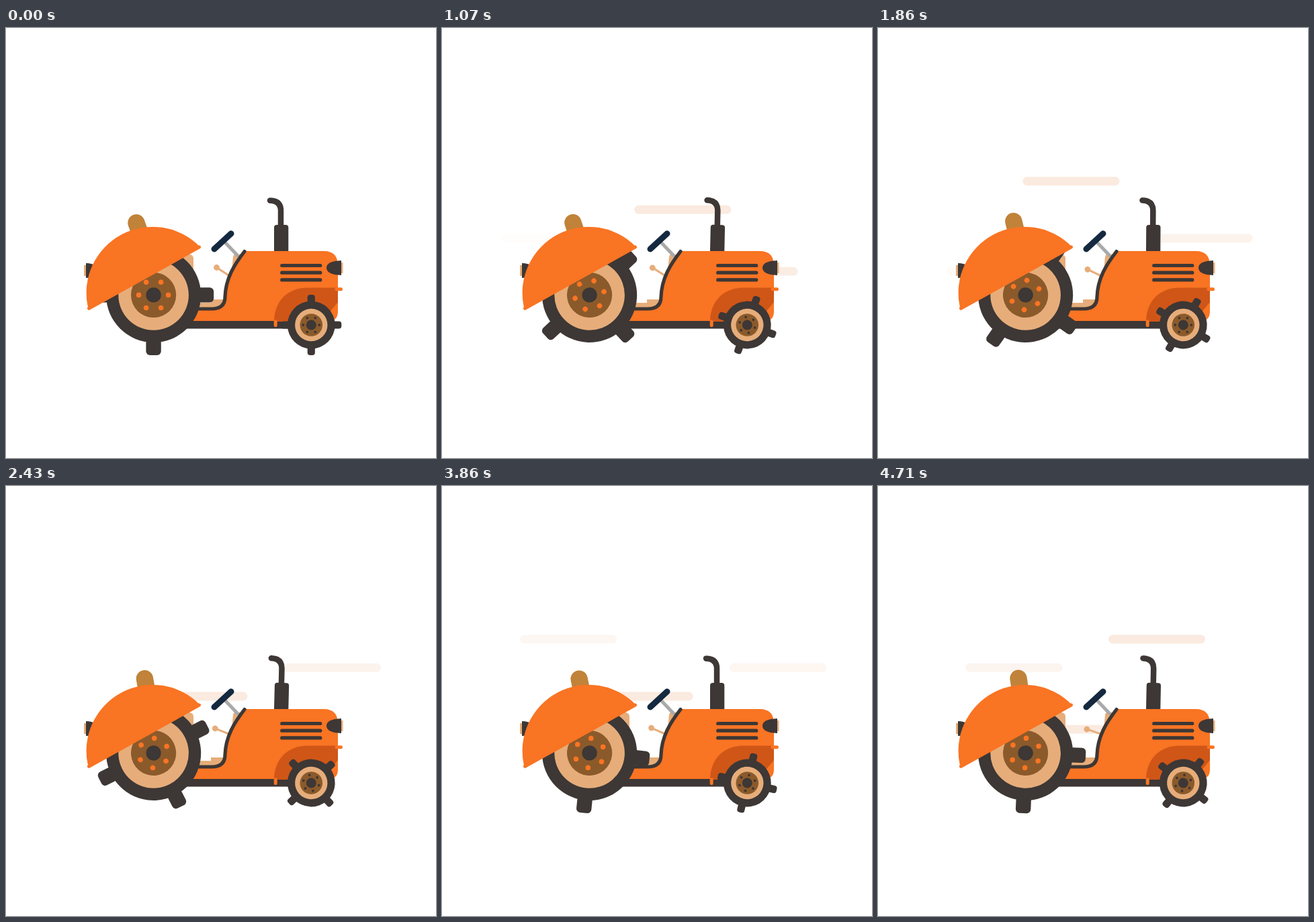
An HTML page that plays this animation: 640 px wide and 640 px high, repeating every 4.78 s.

```html
<!DOCTYPE html>
<html lang="en">
<head>
<meta charset="utf-8">
<title>Tractor</title>
<style>
  html, body { margin: 0; width: 100%; height: 100%; overflow: hidden; background: #fff; }
  svg { display: block; width: 100%; height: 100%; }
  .orange { fill: #f97423; }
  .dark { fill: #3d3735; }
  .tan { fill: #e6ad7a; }
  .brown { fill: #8b5a2b; }
  .line { fill: none; stroke: #3d3735; stroke-width: 5.2; stroke-linecap: round; }
  .trim { fill: none; stroke: #f97423; stroke-width: 5; stroke-linecap: round; stroke-linejoin: round; }
</style>
</head>
<body>
<svg viewBox="0 0 640 640">
  <g id="clouds" fill="#faeadf"></g>

  <!-- rear lamp -->
  <rect class="tan" x="116" y="353" width="4" height="16"/>
  <path class="dark" d="M119 350 Q128 350 136 355 V367 Q128 372 119 372 Z"/>

  <!-- cab -->
  <rect class="tan" x="245" y="337" width="34" height="50" rx="6"/>
  <path class="tan" d="M305 404 H328 V419 H280 V409 H305 Z"/>
  <path class="tan" d="M341 337 H353 L336 364 Q337 350 338 341 Q338.500 337 341 337 Z"/>
  <path d="M325 318 L346 340" fill="none" stroke="#aaa9a9" stroke-width="5"/>
  <path d="M310 329 L335 306" fill="none" stroke="#14293f" stroke-width="9" stroke-linecap="round"/>
  <g id="lever">
    <path d="M313.500 356.500 L335 370.500" fill="none" stroke="#e6ad7a" stroke-width="3"/>
    <circle class="tan" cx="313.500" cy="356.500" r="4.400"/>
  </g>

  <!-- engine -->
  <rect class="dark" x="255" y="434" width="180" height="13.500"/>
  <g id="pipe">
    <rect class="dark" x="399" y="293" width="21.300" height="46" rx="4"/>
    <path class="line" style="stroke-width:8.500" d="M409 298 V272 Q409 257 393 256.700"/>
  </g>
  <path class="orange" d="M355 332 H473 Q494 332 494 354 V422 Q494 436 480 436 H265 V418 H306
    Q326 418 326 400 C327 372 340 352 355 332 Z"/>
  <path class="line" d="M270 418 H306 Q326 418 326 400 C327 372 340 352 355 332.500"/>
  <path class="line" d="M410.700 353.500 H467.800 M410.700 364.200 H467.800 M410.700 374.900 H467.800"/>
  <path d="M399 437 C399 407 419 386.500 449 386.500 H494 V408 L480 425 L425 437 Z" fill="#d05617"/>
  <path class="trim" d="M492 388.800 H498.500 M401.200 437 V442.500"/>
  <rect class="tan" x="497" y="349" width="4.500" height="16"/>
  <path class="dark" d="M499 346 V368 Q477 367 477 357 Q477 347 499 346 Z"/>

  <g id="front"></g>

  <!-- seat, rear wheel, mudguard -->
  <rect id="seat" x="207.800" y="272.800" width="25.400" height="60" rx="12.700" fill="#c08339"/>
  <g id="rear"></g>
  <path class="orange" d="M121.800 415 A98.500 98.500 0 0 1 289 326 L124 418 Z"/>
  <path class="trim" d="M123.500 417.300 L287.500 326"/>
</svg>
<script>
const LOOP = 4780, SHOWN_FPS = 14, CLOCK_FPS = 25;
const NS = 'http://www.w3.org/2000/svg';
const el = id => document.getElementById(id);

function add(parent, tag, attrs) {
  const node = document.createElementNS(NS, tag);
  for (const name in attrs) node.setAttribute(name, attrs[name]);
  return parent.appendChild(node);
}

function disc(parent, r, cls, cx = 0, cy = 0) {
  add(parent, 'circle', { cx, cy, r, class: cls });
}

function buildWheel(id, w) {
  const g = el(id);
  for (let a = 0; a < 360; a += 90) {
    add(g, 'rect', {
      x: w.tyre - 6, y: -w.lug / 2, width: w.reach - w.tyre + 6, height: w.lug,
      rx: w.round, class: 'dark', transform: `rotate(${a})`
    });
  }
  disc(g, w.tyre, 'dark');
  disc(g, w.rim, 'tan');
  disc(g, w.plate, 'brown');
  disc(g, w.hub, 'dark');
  for (let i = 0; i < 6; i++) {
    const a = i * Math.PI / 3;
    disc(g, w.bolt, w.boltClass, w.ring * Math.cos(a), w.ring * Math.sin(a));
  }
  return angle => g.setAttribute('transform', `translate(${w.x} ${w.y}) rotate(${angle})`);
}

const turnRear = buildWheel('rear', {
  x: 219.6, y: 397.4, tyre: 70.6, rim: 52.3, plate: 33.6, hub: 11.2,
  lug: 22.4, reach: 89.6, round: 6, bolt: 3.8, ring: 22, boltClass: 'orange'
});
const turnFront = buildWheel('front', {
  x: 454.3, y: 442, tyre: 35.4, rim: 24.2, plate: 16.8, hub: 7.5,
  lug: 11.2, reach: 45, round: 4, bolt: 1.9, ring: 12, boltClass: 'dark'
});

// Each cloud crosses three times per loop, at the same offsets from its first start.
const PASSES = [0, 43, 80], LIFE = 30;
const clouds = [[228, 29], [270.4, 14], [313, 0], [362.2, 21]].map(([y, start]) => ({
  start,
  node: add(el('clouds'), 'rect', { y: y - 6.4, width: 144, height: 12.8, rx: 6.4 })
}));

function moveCloud({ node, start }, k) {
  const begin = PASSES.map(p => p + start).filter(p => p <= k).pop();
  const age = begin === undefined ? LIFE : k - begin;
  const alpha = Math.max(0, Math.min(1, age / 7, (28 - age) / 8));
  node.setAttribute('x', 470.5 - 14.17 * age);
  node.setAttribute('opacity', alpha);
}

// Turning points of the seat: it swings back and forth between them.
const SWINGS = [0, 13, 24.3, 41, 53.5, 63.8, 76.3, 92, 105, 118, 131];
const ease = u => (1 - Math.cos(Math.PI * u)) / 2;

function swing(k) {
  const i = SWINGS.findIndex((s, n) => k < SWINGS[n + 1]);
  const p = ease((k - SWINGS[i]) / (SWINGS[i + 1] - SWINGS[i]));
  return i % 2 ? 1 - p : p;
}

function draw(ms) {
  const shown = Math.floor((ms % LOOP + 5) * SHOWN_FPS / 1000);
  const k = Math.ceil(shown * CLOCK_FPS / SHOWN_FPS);
  const s = swing(k);
  turnRear(8.41 * k);
  turnFront(14.055 * k);
  clouds.forEach(c => moveCloud(c, k));
  el('seat').setAttribute('transform', `rotate(${-19.5 + 11.2 * s} 220.5 365)`);
  el('lever').setAttribute('transform', `rotate(${-13.8 * s} 334.5 370)`);
  el('pipe').setAttribute('transform', `rotate(${1.5 * ease(2 * k * 0.1243)} 410 333)`);
}

const origin = performance.now();
function tick() {
  draw(performance.now() - origin);
  requestAnimationFrame(tick);
}
tick();
</script>
</body>
</html>
```
